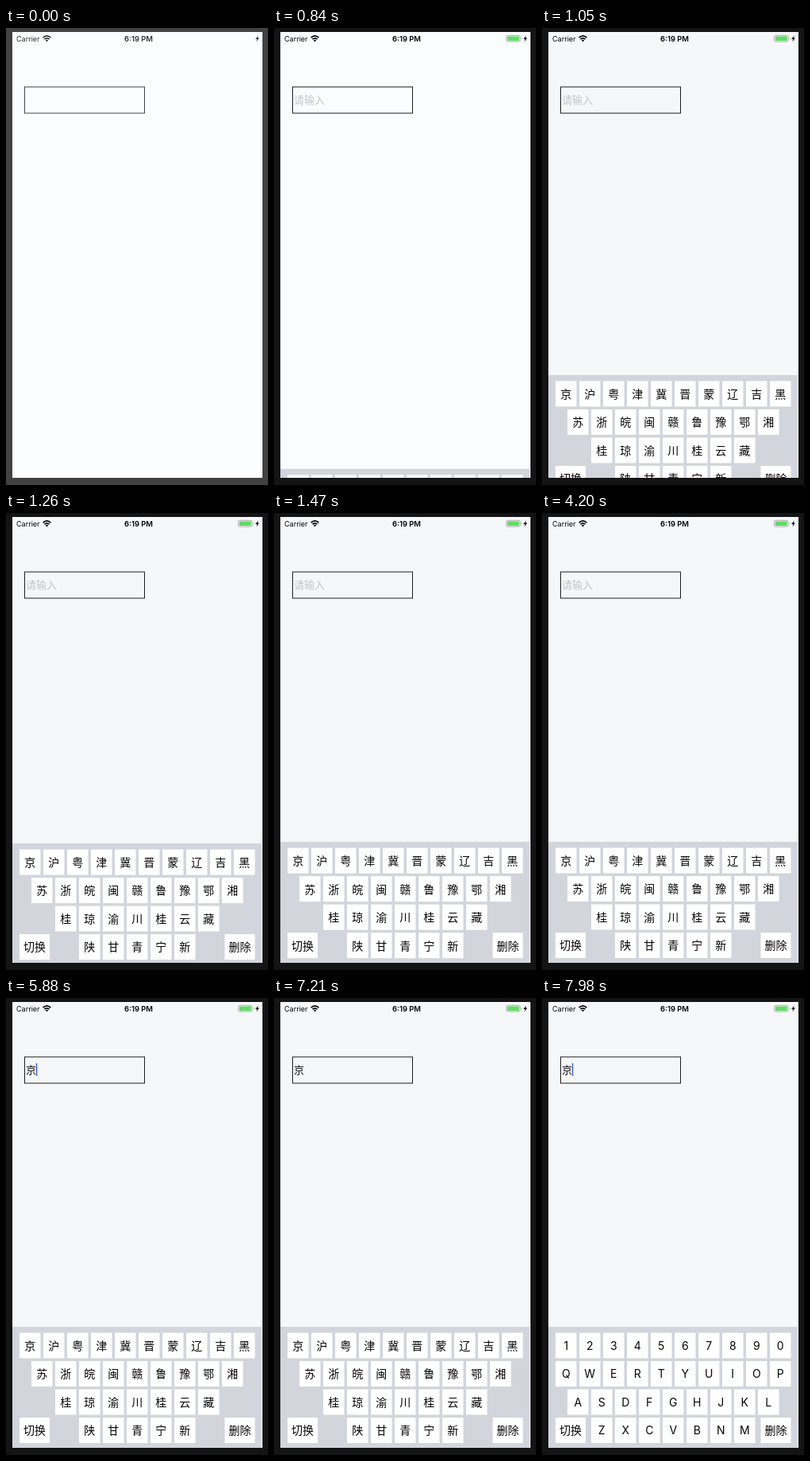
An HTML page for the animation above (8 s loop, 330 px wide and 574 px high).

```html
<!DOCTYPE html>
<html lang="zh">
<head>
<meta charset="utf-8">
<title>Plate keyboard</title>
<style>
  html, body { margin: 0; width: 100%; height: 100%; overflow: hidden; background: #161616; }
  svg { display: block; width: 100vw; height: 100vh; }
  text { font-family: "Inter", "Noto Sans CJK SC", "Noto Sans CJK", sans-serif; }
  .cjk, .keys text { font-family: "Inter", "Noto Sans CJK SC", "Noto Sans CJK", sans-serif; }
  .keys text { font-size: 14px; text-anchor: middle; fill: #050505; }
</style>
</head>
<body>
<svg viewBox="0 0 330 574" preserveAspectRatio="none">
  <defs><clipPath id="clip"><rect x="8" y="5" width="315" height="560"/></clipPath></defs>
  <rect id="bezel" width="330" height="574"/>
  <rect id="screen" x="8" y="5" width="315" height="560"/>
  <g id="status">
    <text x="13" y="16.6" font-size="9">Carrier</text>
    <text x="167" y="16.7" font-size="9.4" font-weight="600" text-anchor="middle">6:19 PM</text>
    <g fill="none" stroke="#000" stroke-width="1.7">
      <path d="M46.6 12.2Q51.5 7.6 56.4 12.2"/>
      <path d="M48.5 14.2Q51.5 11.4 54.5 14.2"/>
    </g>
    <path d="M49.7 15.4Q51.5 13.9 53.3 15.4L51.5 17.2Z"/>
    <path d="M317.8 9.2L314.2 13.9H316.4L315.2 17.4L319 12.4H316.7Z"/>
  </g>
  <g id="battery">
    <rect x="292.5" y="9.3" width="17.6" height="7.8" rx="2" fill="none" stroke="#9a9c9d" stroke-width=".8"/>
    <rect x="293.8" y="10.5" width="15" height="5.4" rx="1" fill="#63dc66"/>
    <path d="M311.2 11.8Q312.5 13.2 311.2 14.6Z" fill="#9a9c9d"/>
  </g>
  <rect id="field" x="23.5" y="74" width="151" height="33" fill="none"/>
  <text id="hint" class="cjk" x="25" y="95" font-size="13" fill="#c3c4c8">请输入</text>
  <text id="value" class="cjk" x="25" y="95" font-size="13" fill="#111">京</text>
  <rect id="caret" y="82" width="1.5" height="16" fill="#4266d8"/>
  <g clip-path="url(#clip)">
    <g id="board" class="keys">
      <rect x="8" y="413" width="314" height="156" fill="#d2d5db"/>
      <g id="provinces"></g>
      <g id="letters"></g>
    </g>
  </g>
</svg>
<script>
const NS = "http://www.w3.org/2000/svg";
const LOOP = 8000, STEP = 70, FADE = 230;
const TYPED = 5390, SWITCHED = 7770;
const BLINKS = [[2060, 2590], [5300, 6090], [6400, 6930], [7450, 8000]];
const $ = id => document.getElementById(id);
const clamp = v => Math.max(0, Math.min(1, v));

function add(parent, tag, attrs, label) {
  const el = document.createElementNS(NS, tag);
  for (const k in attrs) el.setAttribute(k, attrs[k]);
  if (label) el.textContent = label;
  parent.appendChild(el);
}

function key(parent, x, row, label, w = 26.5) {
  const y = 420.5 + row * 35.5;
  add(parent, "rect", { x, y, width: w, height: 32, fill: "#fff" });
  add(parent, "text", { x: x + w / 2, y: y + 21.4 }, label);
}

// Each row is its first key's x position followed by its labels.
function layout(parent, rows) {
  rows.forEach(([x, labels], row) =>
    [...labels].forEach((label, i) => key(parent, x + i * 30, row, label)));
  key(parent, 17, 3, "切换", 38);
  key(parent, 275.5, 3, "删除", 38);
}

layout($("provinces"), [
  [17, "京沪粤津冀晋蒙辽吉黑"],
  [32, "苏浙皖闽赣鲁豫鄂湘"],
  [62, "桂琼渝川桂云藏"],
  [92, "陕甘青宁新"]
]);
layout($("letters"), [
  [17, "1234567890"],
  [17, "QWERTYUIOP"],
  [32, "ASDFGHJKL"],
  [62, "ZXCVBNM"]
]);

function show(id, on) { $(id).setAttribute("visibility", on ? "visible" : "hidden"); }

function grey(from, to, k) {
  const v = Math.round(from + (to - from) * k);
  return `rgb(${v},${v},${v})`;
}

// Critically damped spring from below the screen to rest.
function boardOffset(t) {
  const s = Math.max(0, t - 808) * 0.0139;
  return 152 * (1 + s) * Math.exp(-s);
}

function caretAlpha(t) {
  const blink = BLINKS.find(([on, off]) => t >= on && t < off + FADE);
  return blink ? Math.min(clamp((t - blink[0]) / FADE), 1 - clamp((t - blink[1]) / FADE)) : 0;
}

function draw(t) {
  const intro = clamp(t / 350);
  const bright = t < 980 || (t >= 2100 && t < 2800);
  $("bezel").setAttribute("fill", grey(65, 20, intro));
  $("screen").setAttribute("fill", bright ? "#fbfcfe" : "#f6f7f9");
  $("field").setAttribute("stroke", grey(70, 30, intro));
  $("status").setAttribute("opacity", 0.8 + 0.2 * intro);
  $("battery").setAttribute("opacity", intro);
  $("hint").setAttribute("opacity", intro);
  show("hint", t < TYPED);
  show("value", t >= TYPED);
  $("caret").setAttribute("x", t < TYPED ? 24.5 : 37.8);
  $("caret").setAttribute("opacity", caretAlpha(t));
  $("board").setAttribute("transform", `translate(0 ${boardOffset(t).toFixed(2)})`);
  show("provinces", t < SWITCHED);
  show("letters", t >= SWITCHED);
}

const start = performance.now();
function tick() {
  const t = (performance.now() - start) % LOOP;
  draw(Math.floor(t / STEP) * STEP);
  requestAnimationFrame(tick);
}
tick();
</script>
</body>
</html>
```
